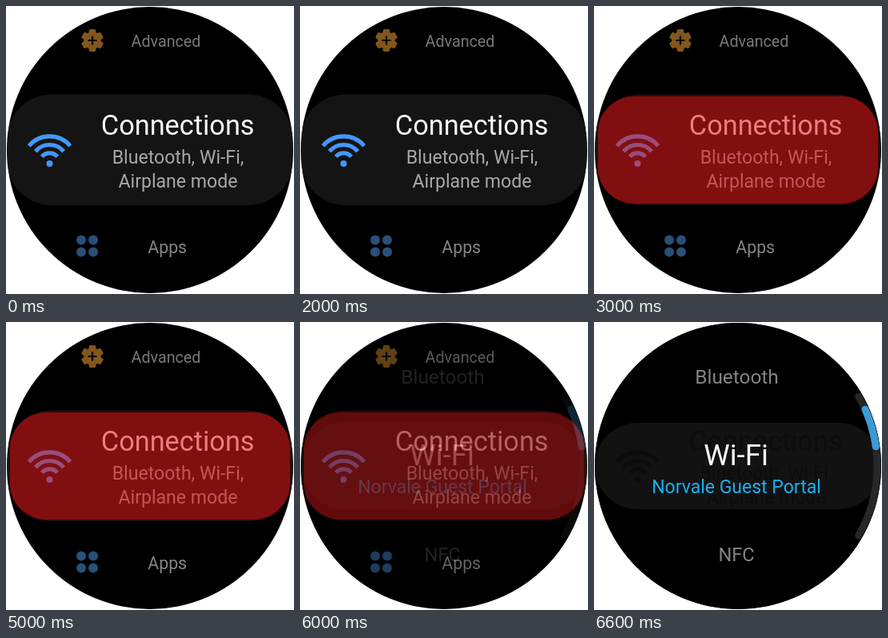
An HTML page that plays this animation: 360x360 px, repeating every 8000 ms.

```html
<!DOCTYPE html>
<html lang="en">
<head>
<meta charset="utf-8">
<title>Watch settings</title>
<style>
  html, body { margin: 0; width: 100%; height: 100%; overflow: hidden; background: #fff; }
  svg { display: block; width: 100vw; height: 100vh; }
  text { font-family: Roboto, "Noto Sans", sans-serif; text-anchor: middle; }
</style>
</head>
<body>
<svg viewBox="0 0 360 360">
  <defs>
    <clipPath id="face"><circle cx="180" cy="180" r="179"/></clipPath>
  </defs>
  <g clip-path="url(#face)">
    <rect width="360" height="360"/>
    <g id="menu">
      <g id="gear" fill="#83561b"></g>
      <path d="M108 37.5v11M102.5 43h11" stroke="#000" stroke-width="2.2"/>
      <text x="200" y="51" font-size="19.7" fill="#787878">Advanced</text>
      <rect x="1" y="110.5" width="358" height="138.5" rx="56" fill="#141414"/>
      <g id="wifi" fill="none" stroke="#4397fb" stroke-width="5.2"></g>
      <text x="214.7" y="161" font-size="34.3" fill="#fafafa">Connections</text>
      <g font-size="23.1" fill="#a8a8a8">
        <text x="215" y="197">Bluetooth, Wi-Fi,</text>
        <text x="215" y="227">Airplane mode</text>
      </g>
      <g id="dots" fill="#28507a"></g>
      <text x="201.7" y="308.5" font-size="21.3" fill="#868686">Apps</text>
      <rect id="mark" x="4.5" y="112.5" width="351" height="135" rx="46"
            fill="#e60a0c" fill-opacity=".52" stroke="#200304" stroke-opacity=".6"/>
    </g>
    <g id="list">
      <rect width="360" height="360"/>
      <text x="178.5" y="76.5" font-size="24.4" fill="#848484">Bluetooth</text>
      <rect x="1" y="126" width="358" height="108" rx="54" fill="#131212"/>
      <g id="trace" opacity=".3">
        <g id="shade" fill="none" stroke="#000" stroke-width="5.2"></g>
        <text x="214.7" y="161" font-size="34.3">Connections</text>
        <text x="215" y="197" font-size="23.1">Bluetooth, Wi-Fi,</text>
        <text x="215" y="227" font-size="23.1">Airplane mode</text>
      </g>
      <text x="177.5" y="178.5" font-size="36.6" fill="#fafafa">Wi-Fi</text>
      <text x="178" y="214" font-size="23" fill="#18b0f0">Norvale Guest Portal</text>
      <text x="178" y="299" font-size="23.6" fill="#848484">NFC</text>
      <g fill="none" stroke-width="9" stroke-linecap="round">
        <path id="track" stroke="#272727"/>
        <path id="thumb" stroke="#3b9bd6"/>
      </g>
    </g>
  </g>
</svg>
<script>
const el = id => document.getElementById(id);

// Arc between two angles in degrees, clockwise from the right
function arc(cx, cy, r, from, to) {
  const at = a => {
    const q = a * Math.PI / 180;
    return (cx + r * Math.cos(q)).toFixed(2) + ' ' + (cy + r * Math.sin(q)).toFixed(2);
  };
  return `M${at(from)}A${r} ${r} 0 0 1 ${at(to)}`;
}

function wifiIcon(color) {
  return [33.6, 23, 12.6].map(r => `<path d="${arc(54.5, 196.5, r, -140, -40)}"/>`).join('') +
    `<circle cx="54.5" cy="197" r="4" fill="${color}" stroke="none"/>`;
}

el('wifi').innerHTML = wifiIcon('#4397fb');
el('shade').innerHTML = wifiIcon('#000');
el('gear').innerHTML = '<circle cx="108" cy="43" r="10.8"/>' +
  [0, 60, 120].map(a =>
    `<rect x="103.6" y="29" width="8.8" height="28" rx="2" transform="rotate(${a} 108 43)"/>`).join('');
el('dots').innerHTML = [94, 109].map(x => [292.5, 307.5].map(y =>
  `<circle cx="${x}" cy="${y}" r="6"/>`).join('')).join('');
el('track').setAttribute('d', arc(180, 180, 174, -30, 30));
el('thumb').setAttribute('d', arc(180, 180, 174, -24, -8));

const LOOP = 8000, FADE = 6000, STEP = 100;

function draw(t) {
  const lit = t >= FADE || Math.floor(t / 1000) % 2 === 1;
  el('mark').style.display = lit ? '' : 'none';
  let mix = 0;
  if (t >= 6600) mix = 1;
  else if (t >= FADE) mix = 0.25 + 0.18 * Math.min(4, Math.floor((t - FADE) / STEP));
  el('list').style.opacity = mix;
  el('trace').style.display = mix === 1 ? '' : 'none';
}

const start = performance.now();
function tick() {
  draw((performance.now() - start) % LOOP);
  requestAnimationFrame(tick);
}
tick();
</script>
</body>
</html>
```
